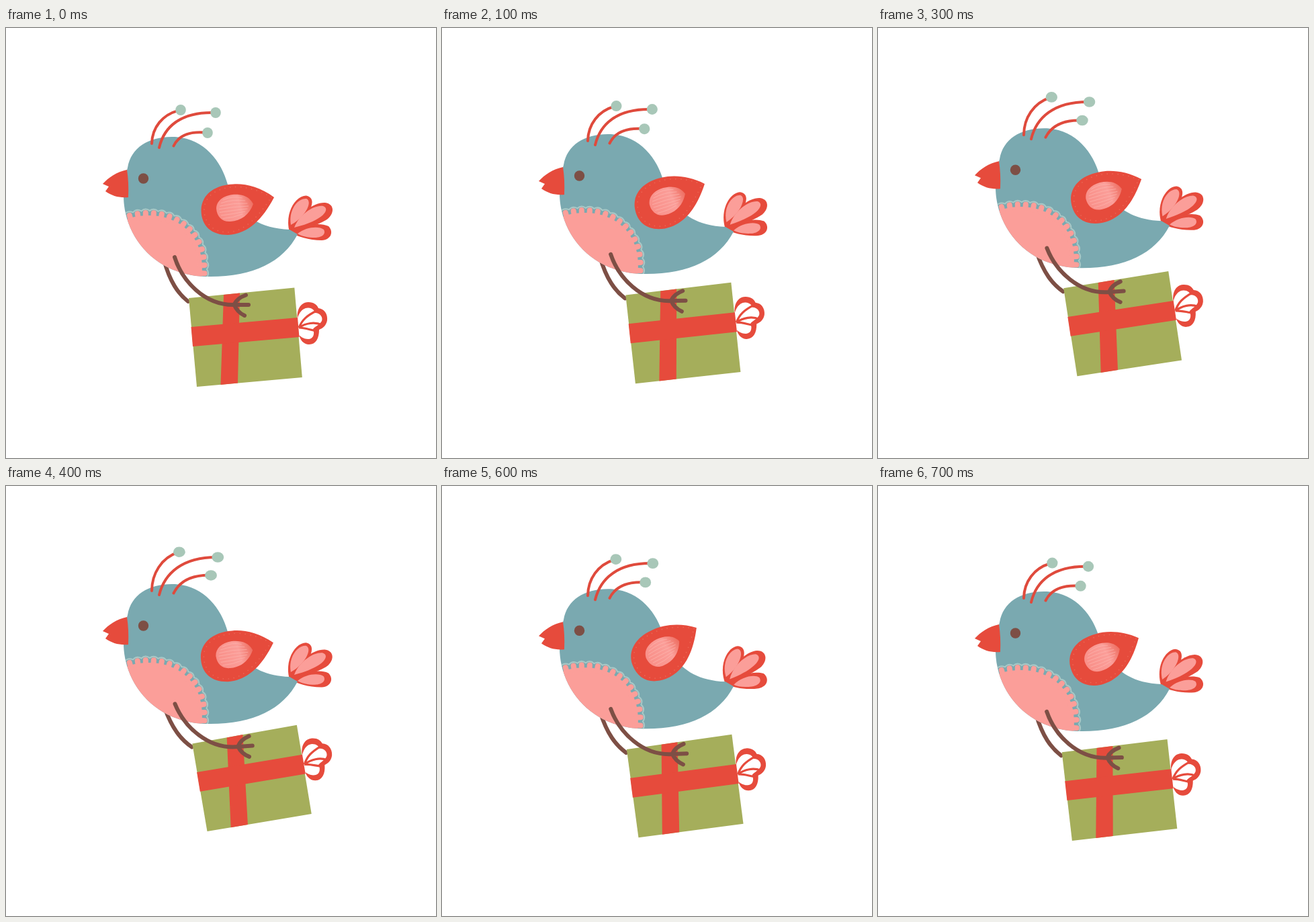
Animation, 640 px wide and 640 px high, one loop 800 ms. Source, as an HTML page:

```html
<!DOCTYPE html>
<html lang="en">
<head>
<meta charset="utf-8">
<title>Bird with a gift</title>
<style>
  html, body { margin: 0; width: 100%; height: 100%; overflow: hidden; background: #fff; }
  svg { display: block; width: 100%; height: 100%; }
  .red { fill: #e64b3c; }
  .pink { fill: #fb9e99; }
  .blue { fill: #7aa9b0; }
  .green { fill: #a5ae5b; }
  .white { fill: #fff; }
  .leg { fill: none; stroke: #7d4f45; stroke-width: 6; stroke-linecap: round; }
  .plume { fill: none; stroke: #df4a3c; stroke-width: 4; stroke-linecap: round; }
  .cord { fill: none; stroke: #e64b3c; stroke-width: 3.2; }
</style>
</head>
<body>
<svg viewBox="0 0 640 640">
  <defs>
    <linearGradient id="down" x1="0" x2="1" y1=".6" y2=".4">
      <stop offset="0" stop-color="#f98f88"/>
      <stop offset=".65" stop-color="#fb9e99"/>
      <stop offset="1" stop-color="#ee6f62"/>
    </linearGradient>
    <clipPath id="inBody"><use href="#body"/></clipPath>
  </defs>

  <g id="bird">
    <g class="swing"><path class="leg" d="M235 345C244 378 256 395 271 407"/></g>

    <g id="tail">
      <path class="red" d="M422 304C414 274 432 249 447 249.500C459 252 457 264 449 276L430 300Z"/>
      <path class="red" d="M423 304C432 277 458 259 475 260C490 262 489 278 476 286C462 294 440 300 423 304Z"/>
      <path class="red" d="M422 304C440 294 465 288 480 295C488 303 484 315 470 316C450 316 434 310 422 304Z"/>
      <path class="pink" d="M424 293C420 270 435 253 447 254C457 258 446 281 424 293Z"/>
      <path class="pink" d="M429 297C436 278 458 263 472 265C483 269 474 286 429 297Z"/>
      <path class="pink" d="M434 306C446 296 466 294 473 300C477 308 468 312 460 312C450 312 440 310 434 306Z"/>
    </g>

    <path id="body" class="blue" d="M181 208C186 178 212 162 247 162C292 162 320 196 330 233C342 268 366 298 422 300L434 307C412 349 367 370.500 302 370C235 370 190 328 178 276C172 250 176 225 181 208Z"/>
    <g id="belly" clip-path="url(#inBody)"></g>

    <path class="red" d="M180 211C165 214 152 223 144 232L153 236L148 243C158 250 168 253 182 252Q183 230 180 211Z"/>
    <circle cx="204.5" cy="224" r="7.7" fill="#7d4f45"/>
    <g id="crest"></g>

    <g class="swing">
      <path class="red" d="M436 441C430 425 436 408 450 408C458 408 463 412 465 417C474 418 479 426 478 435C477 442 472 447 466 449C466 462 461 471 451 471C443 471 437 464 436 455Z"/>
      <path class="white" d="M433 440C433 428 440 416 450 416.500C456 417 459 420 460 424C468 424 472 431 470 436C467 442 460 444 457 448C460 456 457 463 450 463C442 463 437 458 434 455Z"/>
      <path class="cord" d="M436 446C441 434 448 428 462 421M436 446C446 439 460 437 470 442M436 446C446 446 454 450 463 451"/>
      <path class="green" d="M272 402L429.300 386.500L440.800 520L284 534Z"/>
      <path class="red" d="M324 397L348 394.500L345 528.600L319.500 531Z"/>
      <path class="red" d="M275.500 445L434 431L436.500 460L278 474Z"/>
      <path class="leg" d="M251 341C262 376 295 413 340 412L361 412M357 397.500Q344 402 339.500 411.500Q344 423 355 428"/>
    </g>

    <g id="wing">
      <path class="red" d="M399 252C378 236 354 231 338 232.500C306 234 290 252 290.500 272C291 295 306 308 330 308C362 307 384 281 399 252Z"/>
      <path d="M395 252C375 240 352 235 336 237C309 239 294 254 295 272C296 292 309 304 330 304C357 303 377 278 395 252Z"
            fill="none" stroke="#ec6956" stroke-width="1.6" stroke-linecap="round" stroke-dasharray="0 8"/>
      <path fill="url(#down)" d="M368 262C362 250 350 247 337 248C321 250 313 259 313 269C314 281 322 289 334 288C350 287 362 278 368 262Z"/>
      <g id="down-lines" fill="none" stroke="#fdb9b3" stroke-width=".8" opacity=".75"></g>
    </g>
  </g>
</svg>
<script>
  const $ = id => document.getElementById(id);
  function add(parent, tag, attrs) {
    const el = document.createElementNS('http://www.w3.org/2000/svg', tag);
    for (const k in attrs) el.setAttribute(k, attrs[k]);
    return parent.appendChild(el);
  }

  // Belly: teeth and a scalloped thread follow one curve.
  function buildBelly() {
    const g = $('belly');
    const edge = add(g, 'path', { d: 'M176 275C236 254 311 287 301 372', fill: 'none' });
    const count = 15, len = edge.getTotalLength(), h = 0.5;
    const at = (s, depth) => {
      const p = edge.getPointAtLength(s);
      const a = edge.getPointAtLength(Math.max(0, s - h));
      const b = edge.getPointAtLength(Math.min(len, s + h));
      const d = Math.hypot(b.x - a.x, b.y - a.y);
      return [p.x - (b.y - a.y) / d * depth, p.y + (b.x - a.x) / d * depth]
        .map(v => v.toFixed(1)).join(' ');
    };
    let inner = 'M', teeth = '', thread = 'M' + at(0, 2);
    for (let i = 0; i < count; i++) {
      const s = i * len / count, mid = (i + .5) * len / count;
      inner += at(s, 10) + 'L';
      teeth += 'M' + at(mid, 13) + 'L' + at(mid, 6);
      thread += 'Q' + at(mid, -2) + ' ' + at(s + len / count, 3);
    }
    inner += at(len, 10) + 'L300 380L160 380Z';
    add(g, 'path', { d: inner, class: 'pink' });
    add(g, 'path', { d: teeth, stroke: '#fb9e99', 'stroke-width': 8, 'stroke-linecap': 'round' });
    add(g, 'path', { d: thread, fill: 'none', stroke: '#a9c8c6', 'stroke-width': 2 });
  }

  function buildDown() {
    for (let i = 0; i < 7; i++) {
      const y = 254 + i * 4.6, inset = Math.abs(i - 3) ** 1.6;
      add($('down-lines'), 'path', {
        d: `M${317 + inset} ${y + 2}Q338 ${y - 5 + i} ${361 - inset * 1.6} ${y - 1 - i * .6}`
      });
    }
  }

  // Each plume: base, two bends, ball, and how far the ball drifts at full lift.
  const plumes = [
    { pts: [217, 172, 217.5, 149, 232, 128, 260, 122], drift: [-1.7, -6.3] },
    { pts: [228, 178, 235, 148, 259, 124, 312, 126], drift: [2.6, -3.2] },
    { pts: [249.5, 175.5, 257, 160, 272, 153, 300, 156], drift: [4, -5.7] }
  ];
  for (const p of plumes) {
    p.line = add($('crest'), 'path', { class: 'plume' });
    p.ball = add($('crest'), 'ellipse', { fill: '#a8c7b8' });
  }

  function bendPlume(p, k) {
    const q = p.pts.map((v, i) => v + p.drift[i % 2] * k * [0, .2, .7, 1][i >> 1]);
    p.line.setAttribute('d', `M${q[0]} ${q[1]}C${q.slice(2).join(' ')}`);
    const shape = { cx: q[6], cy: q[7], rx: 7.8 + .9 * k, ry: 8 - .2 * k };
    for (const a in shape) p.ball.setAttribute(a, shape[a]);
  }

  const STEP = 100;
  const poses = [   // lift, wing angle
    [0, 0], [4, 9.4], [7.5, 20], [12.8, 8.2],
    [16, 1.5], [12, 11.8], [8.7, 20], [5, 12.3]
  ];
  const turn = (el, deg, x, y) => el.setAttribute('transform', `rotate(${deg} ${x} ${y})`);
  const swings = document.querySelectorAll('.swing');

  function draw(t) {
    const [lift, flap] = poses[Math.floor(t / STEP) % poses.length];
    $('bird').setAttribute('transform', `translate(0 ${-lift})`);
    turn($('wing'), -flap, 297, 293);
    turn($('tail'), -flap * .37, 423, 303);
    swings.forEach(el => turn(el, -lift * .28, 242, 334));
    plumes.forEach(p => bendPlume(p, lift / 12.8));
  }

  buildBelly();
  buildDown();
  draw(0);
  const start = performance.now();
  (function tick() {
    draw(performance.now() - start);
    requestAnimationFrame(tick);
  })();
</script>
</body>
</html>
```
